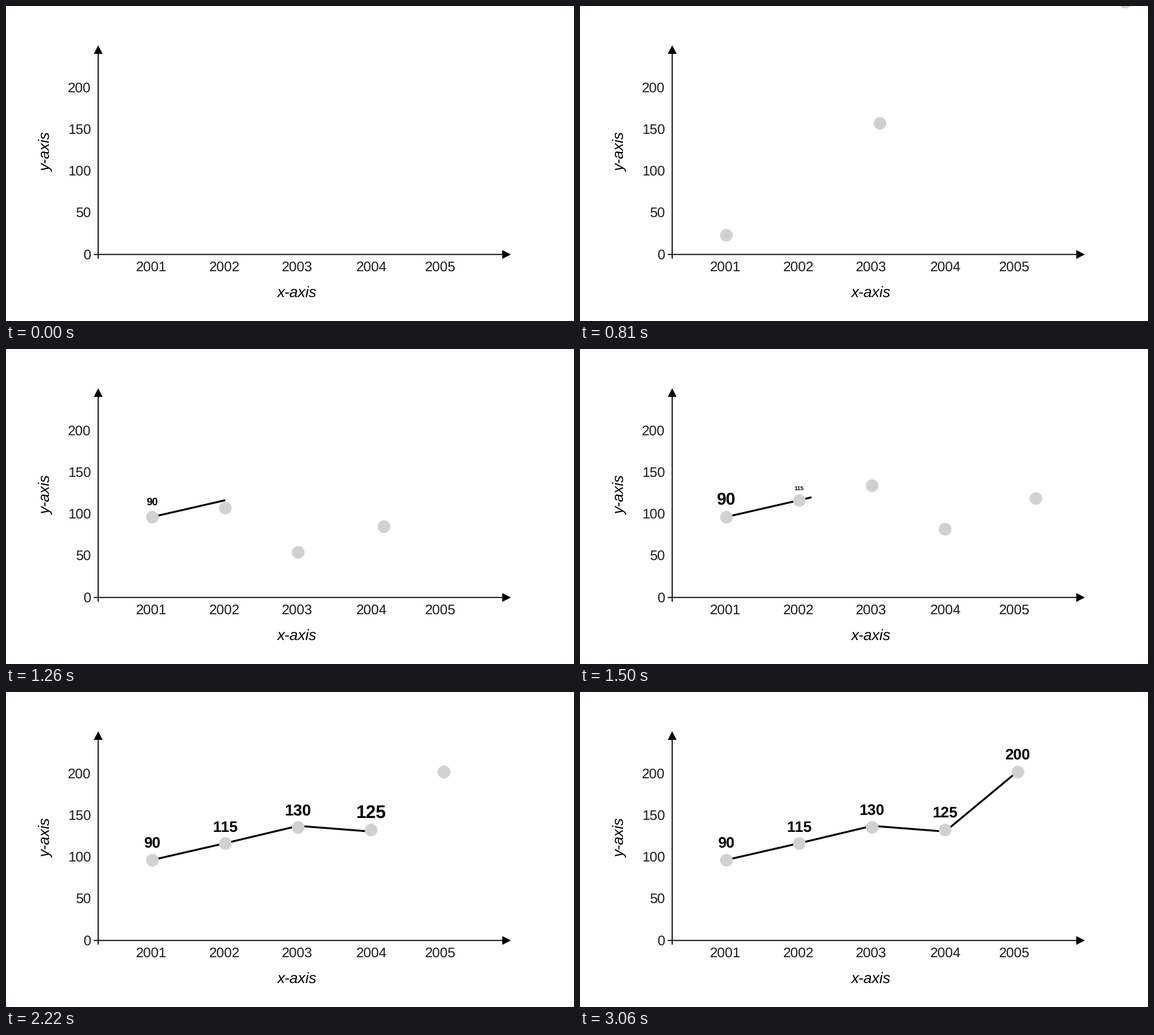
These frames come from a looping animation (900x500 px, 5.4 s). A matplotlib script:

```python
import math

import matplotlib.pyplot as plt
from matplotlib.animation import FuncAnimation
from matplotlib.patches import Circle, Polygon

W, H, DPI = 900, 500, 100
STEP_MS, LOOP_MS = 30, 5400
PX = 72 / DPI  # points per pixel

plt.rcParams["font.family"] = "Liberation Sans"
plt.rcParams["text.hinting"] = "none"
plt.rcParams["text.kerning_factor"] = 6  # even digit spacing

VALUES = (90, 115, 130, 125, 200)
DOT_Y = (267, 240.5, 215, 219, 127)
LINE_Y = (266.5, 240, 212.5, 221.5, 125.5)
LAND_MS = (772, 995, 1176, 1355, 1637)
YEAR_X = (230.5, 346.5, 461.5, 579.5, 688.5)

ENTRY_X, FLOOR, DROP = 930, 383, 420
FALL_MS, LIFT_MS = 395, 360
GROW_MS, SETTLE_MS, PEAK = 190, 430, 1.2
LABEL_PX, LABEL_GAP = 24, 19


def column_x(k):
    return 232 + 115.5 * k


def progress(t, start, duration):
    return min(max((t - start) / duration, 0), 1)


def dot_position(t, k):
    """Swoop in from the upper right, touch the axis, then rise to rest."""
    x = column_x(k)
    left = 1 - progress(t, LAND_MS[k] - FALL_MS, FALL_MS)
    rise = math.sin(progress(t, LAND_MS[k], LIFT_MS) * math.pi / 2)
    return (x + (ENTRY_X - x) * left ** 2,
            FLOOR - DROP * left + (DOT_Y[k] - FLOOR) * rise)


def label_scale(t, k):
    start = 1150 + 290 * k
    grow = progress(t, start, GROW_MS)
    settle = progress(t, start + GROW_MS, SETTLE_MS)
    return PEAK * grow - (PEAK - 1) * settle


def line_points(t):
    points = [(column_x(0), LINE_Y[0])]
    for k in range(len(VALUES) - 1):
        p = progress(t, 1100 + 375 * k, 150)
        if p > 0:
            points.append((column_x(k + p),
                           LINE_Y[k] + (LINE_Y[k + 1] - LINE_Y[k]) * p))
    return points


fig = plt.figure(figsize=(W / DPI, H / DPI), dpi=DPI, facecolor="white")
ax = fig.add_axes([0, 0, 1, 1])
ax.set(xlim=(0, W), ylim=(H, 0))
ax.axis("off")


def write(x, y, text, px, **style):
    style = {"ha": "center", "va": "baseline", "color": "black", **style}
    return ax.text(x, y, text, fontsize=px * PX, **style)


def draw_axes(x=146.1, y=394.4):
    rule = dict(color="black", lw=1.7 * PX, solid_capstyle="butt", snap=False)
    ax.plot([x, x], [401, 74], **rule)
    ax.plot([139, 788], [y, y], **rule)
    for tip in ([(x, 62.3), (x - 7, 76), (x + 7, 76)],
                [(800, y), (786.3, y - 7), (786.3, y + 7)]):
        ax.add_patch(Polygon(tip, color="black", lw=0))
    tick = dict(px=22, color="#1a1a1a")
    for i in range(5):
        write(134.8, 401.3 - 66.1 * i, str(50 * i), ha="right", **tick)
        write(YEAR_X[i], 421.2, str(2001 + i), **tick)
    write(461, 462, "x-axis", 24, style="italic")
    write(70, 232, "y-axis", 24, style="italic", rotation=90,
          rotation_mode="anchor")


draw_axes()
line, = ax.plot([], [], color="black", lw=3 * PX, zorder=3,
                solid_capstyle="butt", solid_joinstyle="miter")
dots = [ax.add_patch(Circle((0, 0), 10, color="#d1d1d1", lw=0, zorder=4))
        for _ in VALUES]
labels = [write(column_x(k) - 0.5, 0, str(value), LABEL_PX,
                weight="bold", zorder=5)
          for k, value in enumerate(VALUES)]


def update(frame):
    t = frame * STEP_MS
    line.set_data(*zip(*line_points(t)))
    for k, (dot, label) in enumerate(zip(dots, labels)):
        dot.center = dot_position(t, k)
        scale = label_scale(t, k)
        label.set_visible(scale > 0.05)
        label.set_fontsize(max(scale, 0.05) * LABEL_PX * PX)
        label.set_y(DOT_Y[k] - LABEL_GAP - 3.5 * (scale - 1))
    return [line, *dots, *labels]


anim = FuncAnimation(fig, update, frames=LOOP_MS // STEP_MS, interval=STEP_MS,
                     repeat=True, repeat_delay=0, blit=False)
plt.show()
```
